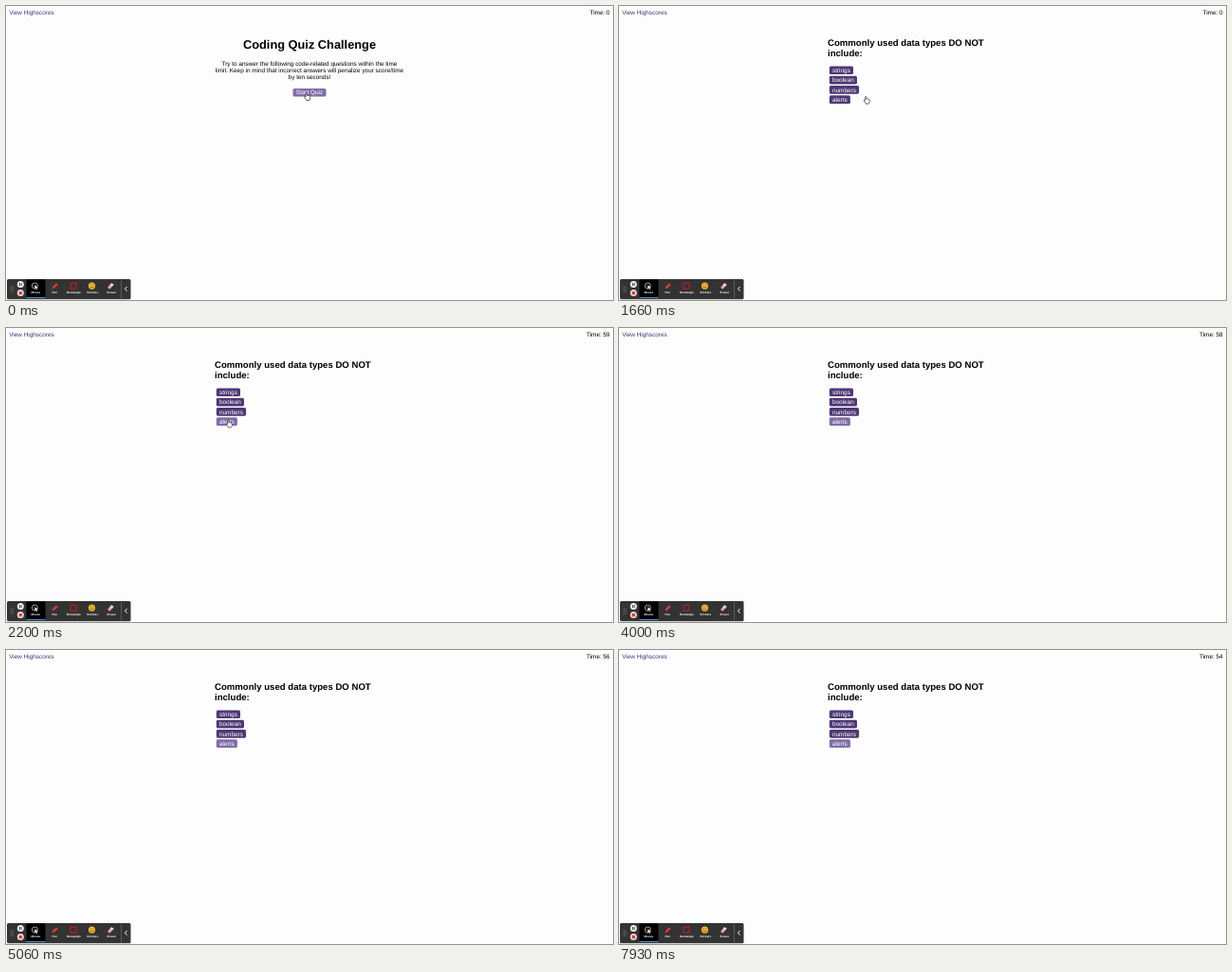
An HTML page that plays this animation: 640 by 310 pixels, repeating every 8 s.

```html
<!DOCTYPE html>
<html lang="en">
<head>
<meta charset="utf-8">
<title>Coding quiz</title>
<style>
html, body { margin: 0; width: 100%; height: 100%; overflow: hidden; background: #fdfdfd; }
svg { display: block; width: 640px; height: 310px; }
text { font: 6.4px "Liberation Sans", Arial, sans-serif; text-rendering: geometricPrecision; }
.mid { text-anchor: middle; }
.end { text-anchor: end; }
.h1 { font-size: 12.8px; font-weight: bold; }
.h2 { font-size: 9.6px; font-weight: bold; }
.label { font-size: 3.05px; font-weight: bold; fill: #fff; text-anchor: middle; }
.button { fill: #fff; }
</style>
</head>
<body>
<svg viewBox="0 0 640 310">
  <rect width="640" height="310" fill="#fdfdfd"/>
  <text x="3.2" y="9.2" fill="#45336f">View Highscores</text>
  <text id="timer" class="end" x="636.6" y="9.2">Time: 0</text>

  <g id="intro">
    <text class="h1 mid" x="320" y="45.3">Coding Quiz Challenge</text>
    <text class="mid" x="320" y="62.5">Try to answer the following code-related questions within the time</text>
    <text class="mid" x="320" y="69.9">limit. Keep in mind that incorrect answers will penalize your score/time</text>
    <text class="mid" x="320" y="77.2">by ten seconds!</text>
    <rect x="302.5" y="86.9" width="35" height="8.7" rx="1.6" fill="#806ca9"/>
    <text class="button mid" x="320" y="93.4">Start Quiz</text>
  </g>

  <g id="quiz">
    <text class="h2" x="220" y="42">Commonly used data types DO NOT</text>
    <text class="h2" x="220" y="53">include:</text>
    <g id="answers"></g>
  </g>

  <g id="toolbar">
    <rect x="1" y="288" width="130.5" height="21.3" rx="1.5" fill="#333"/>
    <rect x="21.5" y="288.3" width="20" height="19.4" fill="#000"/>
    <rect x="21.5" y="307" width="20" height="1" fill="#4a8fc4"/>
    <path d="M5.2 295.8v6M7.2 295.8v6" stroke="#aaa" stroke-width=".9" stroke-dasharray=".9 1.5"/>
    <circle cx="15.3" cy="293.5" r="3.5" fill="#eee"/>
    <path d="M14.4 292v3M16.2 292v3" stroke="#333" stroke-width=".9"/>
    <circle cx="15.3" cy="302.6" r="3.5" fill="#f3dada"/>
    <rect x="13.7" y="301" width="3.2" height="3.2" rx=".5" fill="#d43a3a"/>
    <circle cx="30.4" cy="295" r="3" fill="none" stroke="#c9b0a8" stroke-width=".9"/>
    <path d="M30.2 294v5l1.3-1.2 1 1.5.8-.5-.8-1.5 1.7-.3z" fill="#fff" stroke="#000" stroke-width=".3"/>
    <path d="M48.5 298.2l.8-2.4 3.7-3.5 1.7 1.7-3.7 3.5z" fill="#dd3b3d"/>
    <rect x="68" y="292.3" width="6" height="5.8" fill="none" stroke="#b91c22" stroke-width="1.2"/>
    <circle cx="90.5" cy="295.1" r="3.6" fill="#f1b934"/>
    <path d="M89.2 293.4v1M91.8 293.4v1M88.4 295.8q2.1 2.7 4.2 0" fill="none" stroke="#6b4615" stroke-width=".7"/>
    <path d="M107.3 296.6l3.8-4.3 2.5 1.5-3.8 4.4h-1.6z" fill="#e7a4ae"/>
    <path d="M109.3 294.4l1.8-2.1 2.5 1.5-1.9 2.1z" fill="#d8d8dc"/>
    <path d="M121.5 289v19.5" stroke="#777" stroke-width=".6"/>
    <path d="M127.5 296l-2 2.3 2 2.3" fill="none" stroke="#fff" stroke-width="1"/>
  </g>

  <path id="hand" d="M-1.3 .6V-3q0-.8.7-.8T.1-3v2q.2-.7.9-.5.4.1.4.6.8-.5 1.1.4.9-.3.9.7V1.5q0 1-.7 2V4H-.8V3.4L-2.7.9Q-3 0-2.2 0z"
    fill="#fff" stroke="#222" stroke-width=".65" stroke-linejoin="round"/>
</svg>
<script>
const LOOP = 8000, QUIZ_START = 1200, FIRST_TICK = 2060, HAND_HIDDEN = 4000;
const NORMAL = [78, 56, 116], HOVER = [128, 108, 169];
const $ = id => document.getElementById(id);
const ramp = (t, from, to) => Math.min(1, Math.max(0, (t - from) / (to - from)));
const ease = u => u * u * (3 - 2 * u);
const mix = (a, b, u) => a + (b - a) * u;
const show = (id, on) => $(id).setAttribute("visibility", on ? "visible" : "hidden");

$("answers").innerHTML = [["strings", 25.2], ["boolean", 29.2], ["numbers", 31.3], ["alerts", 22.1]]
  .map(([word, width], i) => {
    const y = 63.4 + i * 10.3;
    return `<rect x="221.8" y="${y}" width="${width}" height="8.7" rx="1.6" fill="rgb(${NORMAL})"/>
      <text class="button" x="225" y="${y + 6.5}">${word}</text>`;
  }).join("");
const alertsButton = $("answers").querySelectorAll("rect")[3];

$("toolbar").insertAdjacentHTML("beforeend",
  ["Mouse", "Pen", "Rectangle", "Stickers", "Eraser"]
    .map((name, i) => `<text class="label" x="${31.3 + i * 20}" y="303.2">${name}</text>`).join(""));

function draw(t) {
  show("intro", t < QUIZ_START);
  show("quiz", t >= QUIZ_START);
  show("hand", t < HAND_HIDDEN);

  const seconds = t < FIRST_TICK ? 0 : 59 - Math.floor((t - FIRST_TICK) / 1000);
  $("timer").textContent = "Time: " + seconds;

  const move = ease(ramp(t, 1260, 1900));
  $("hand").setAttribute("transform", `translate(${mix(317.3, 235, move)} ${mix(95.5, 100.8, move)})`);

  const hover = ramp(t, 1800, 2000);
  alertsButton.setAttribute("fill", `rgb(${NORMAL.map((c, i) => Math.round(mix(c, HOVER[i], hover)))})`);
}

const start = performance.now();
function frame() {
  draw((performance.now() - start) % LOOP);
  requestAnimationFrame(frame);
}
frame();
</script>
</body>
</html>
```
